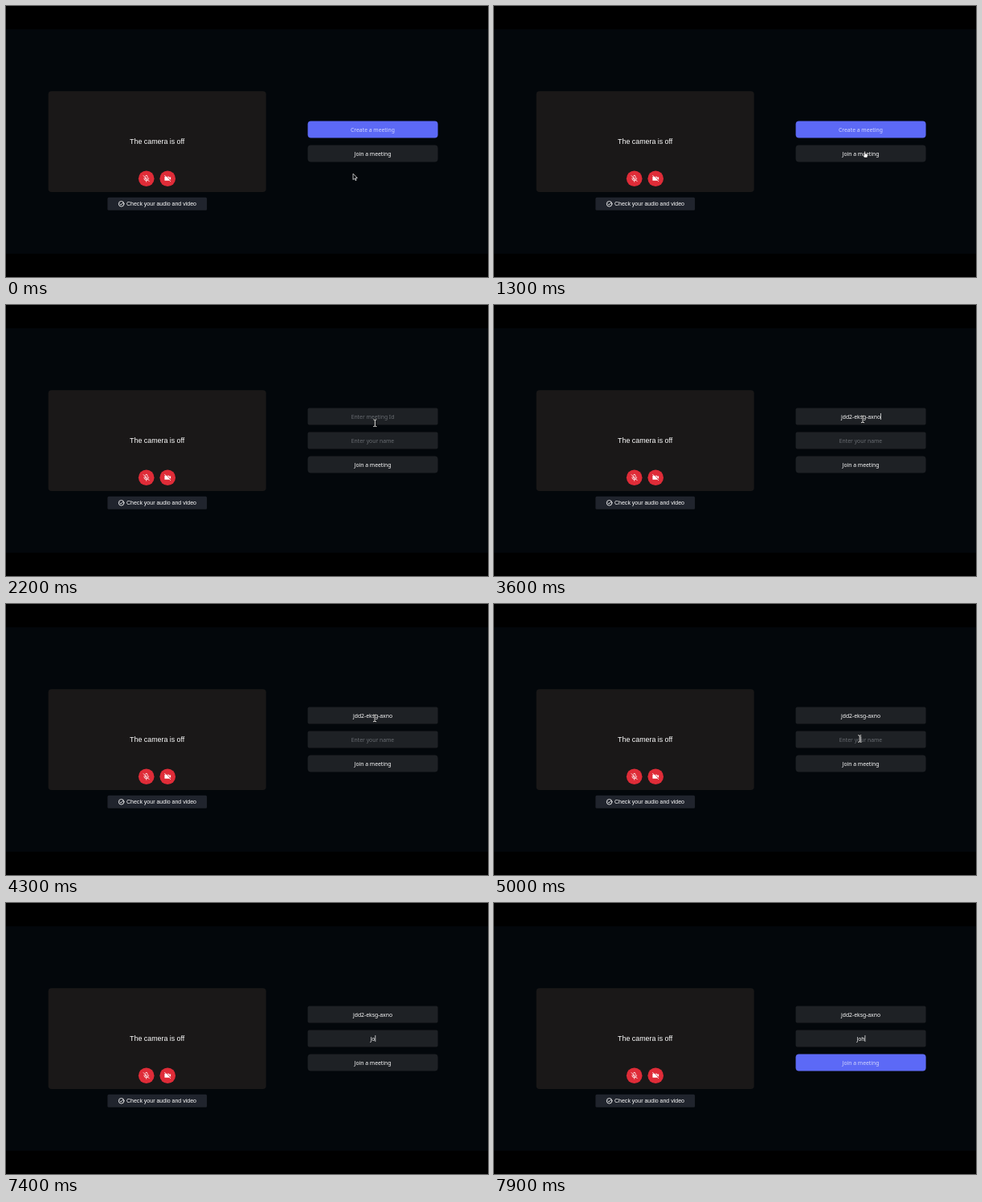
Animation, 600 px wide and 338 px high, one loop 8 s. Source, as an HTML page:

```html
<!DOCTYPE html>
<html lang="en">
<head>
<meta charset="utf-8">
<title>Join a meeting</title>
<style>
  html, body { margin: 0; width: 100%; height: 100%; overflow: hidden; background: #000; }
  svg { display: block; width: 100vw; height: 100vh; }
  text { fill: #fff; text-anchor: middle; }
  .ui { font: 6.8px "Noto Sans", "Open Sans", sans-serif; }
  .plain { font-family: "Liberation Sans", Arial, sans-serif; }
  .dark { fill: #1e2125; }
  .accent { fill: #5c69f6; }
  .line { fill: none; stroke: #fff; stroke-linecap: round; stroke-linejoin: round; }
</style>
</head>
<body>
<svg viewBox="0 0 600 338">
  <rect width="600" height="338" fill="#000"/>
  <rect y="29" width="600" height="280" fill="#03070b"/>

  <rect x="52.7" y="106.2" width="271" height="125.8" rx="4" fill="#1a1818"/>
  <text class="plain" x="188.2" y="172" font-size="8.85">The camera is off</text>

  <g fill="#df2c38">
    <circle cx="174.7" cy="215.2" r="9.8"/>
    <circle cx="201.2" cy="215.2" r="9.8"/>
  </g>
  <g class="line" transform="translate(174.7 215.2)" stroke-width=".8">
    <rect x="-1.3" y="-3.8" width="2.6" height="4.9" rx="1.3"/>
    <path d="M-2.9 -.3a2.9 2.9 0 0 0 5.8 0M0 2.6V4"/>
    <path d="M-3 -4L4.2 3.2" stroke="#df2c38"/>
    <path d="M-3.6 -3.6L3.6 3.6"/>
  </g>
  <g transform="translate(201.2 215.2)">
    <path d="M-3.3 -2.5H1.6Q2.1 -2.5 2.1 -2V-.6L3.9 -2.3V2.3L2.1 .6V2Q2.1 2.5 1.6 2.5H-3.3Q-3.8 2.5 -3.8 2V-2Q-3.8 -2.5 -3.3 -2.5Z" fill="#fff"/>
    <path class="line" d="M-2.7 -4.2L4.3 2.8" style="stroke:#df2c38"/>
    <path class="line" d="M-3.7 -3.9L3.5 3.5" stroke-width=".8"/>
  </g>

  <rect x="126.4" y="238.8" width="123.7" height="16" rx="1.6" fill="#20242d"/>
  <g class="line" stroke-width=".85">
    <circle cx="143.6" cy="246.8" r="3.3"/>
    <path d="M142 246.9l1.2 1.2 2.2-2.5"/>
  </g>
  <text class="plain" x="193.5" y="249.2" font-size="7.02">Check your audio and video</text>

  <g id="home" class="ui">
    <rect class="accent" x="375.6" y="143.6" width="162" height="21" rx="4"/>
    <text x="456.5" y="156.6" style="fill:#d3d7fd">Create a meeting</text>
    <rect class="dark" x="375.6" y="173.6" width="162" height="21" rx="4"/>
    <text x="456.5" y="186.6">Join a meeting</text>
  </g>

  <g id="form" class="ui">
    <rect class="dark" x="375.6" y="128.6" width="162" height="21" rx="2"/>
    <text id="meeting" x="456.5" y="141.6"></text>
    <rect class="dark" x="375.6" y="158.6" width="162" height="21" rx="2"/>
    <text id="name" x="456.5" y="171.6"></text>
    <rect class="dark" x="375.6" y="188.6" width="162" height="21" rx="4"/>
    <rect id="ready" class="accent" x="375.6" y="188.6" width="162" height="21" rx="4"/>
    <text id="joinLabel" x="456.5" y="201.6">Join a meeting</text>
    <rect id="caret" width=".7" height="8" fill="#fff"/>
  </g>

  <path id="arrow" d="M0 0V7.4L1.8 5.8L3 8.4L4.2 7.9L3.1 5.3H5.4Z" fill="#05080b" stroke="#fff" stroke-width=".7" stroke-linejoin="round"/>
  <path id="hand" d="M-.7 .5Q0 -.5 .6 .5V3L3 3.5Q3.7 3.8 3.6 4.6L3 7.8H-.6L-2.3 5.2Q-2.3 4.2 -1.4 4.7L-.7 5.2Z" fill="#fff" stroke="#111" stroke-width=".4"/>
  <g id="beam" fill="none">
    <path d="M-2 -4.3Q0 -4.3 0 -3.5Q0 -4.3 2 -4.3M0 -3.5V3.5M-2 4.3Q0 4.3 0 3.5Q0 4.3 2 4.3" stroke="#111" stroke-width="1.7"/>
    <path d="M-2 -4.3Q0 -4.3 0 -3.5Q0 -4.3 2 -4.3M0 -3.5V3.5M-2 4.3Q0 4.3 0 3.5Q0 4.3 2 4.3" stroke="#fff" stroke-width=".9"/>
  </g>
</svg>
<script>
  const LOOP = 8000, STEP = 100, BLINK = 550, CENTER = 456.5;
  const FORM_OPEN = 1400, PASTE = 3600, CURSOR_HIDDEN = 7200, READY = 7500;
  const MEETING_ID = "jdd2-eksg-axno";
  const NAME_KEYS = [[6200, "J"], [7000, "Jo"], [7600, "Joh"]];
  // Each of these restarts the caret blink.
  const CARET_RESETS = [2500, PASTE, 5000, ...NAME_KEYS.map(key => key[0])];

  const easeInOut = p => p * p * (3 - 2 * p);
  const easeOut = p => 1 - (1 - p) ** 3;
  const MOVES = [
    { start: 0, end: 1200, from: [432, 209.2], to: [461.6, 181.2], ease: easeInOut },
    { start: 1800, end: 2600, from: [461.6, 181.2], to: [459, 142.4], ease: easeOut },
    { start: 4400, end: 4950, from: [459, 142.4], to: [455.2, 168], ease: easeInOut }
  ];

  const el = Object.fromEntries([...document.querySelectorAll("[id]")].map(node => [node.id, node]));
  const clamp = v => Math.max(0, Math.min(1, v));
  const show = (node, on) => node.setAttribute("visibility", on ? "visible" : "hidden");
  const latest = (list, t) => list.filter(item => item <= t).pop();

  function setField(node, value, placeholder) {
    const label = value || placeholder;
    if (node.textContent !== label) node.textContent = label;
    node.style.fill = value ? "#fff" : "#686c71";
  }

  function cursorAt(t) {
    const move = MOVES.filter(m => m.start <= t).pop();
    const p = move.ease(clamp((t - move.start) / (move.end - move.start)));
    return move.from.map((v, i) => v + (move.to[i] - v) * p);
  }

  function cursorKind(y, formOpen) {
    if (!formOpen) return y < 194.6 ? "hand" : "arrow";
    const inField = [128.6, 158.6].some(top => y >= top && y <= top + 21);
    return inField ? "beam" : "arrow";
  }

  function drawCaret(t) {
    const reset = latest(CARET_RESETS, t);
    const on = reset !== undefined && Math.floor((t - reset) / BLINK) % 2 === 0;
    show(el.caret, on);
    if (!on) return;
    const second = t >= 5000;
    const field = second ? el.name : el.meeting;
    const filled = t >= (second ? NAME_KEYS[0][0] : PASTE);
    const half = filled ? field.getComputedTextLength() / 2 : 0;
    el.caret.setAttribute("x", CENTER + half);
    el.caret.setAttribute("y", second ? 165 : 135);
  }

  function draw(t) {
    const formOpen = t >= FORM_OPEN;
    el.home.style.display = formOpen ? "none" : "";
    el.form.style.display = formOpen ? "" : "none";

    const typed = NAME_KEYS.filter(key => key[0] <= t).pop();
    setField(el.meeting, t >= PASTE ? MEETING_ID : "", "Enter meeting Id");
    setField(el.name, typed ? typed[1] : "", "Enter your name");
    drawCaret(t);

    const ready = clamp((t - READY) / 300);
    el.ready.setAttribute("opacity", ready);
    el.joinLabel.style.fill = `rgb(${255 - 44 * ready},${255 - 40 * ready},${255 - 2 * ready})`;

    const [x, y] = cursorAt(t);
    const kind = cursorKind(y, formOpen);
    for (const id of ["arrow", "hand", "beam"]) {
      show(el[id], id === kind && t < CURSOR_HIDDEN);
      el[id].setAttribute("transform", `translate(${x} ${y})`);
    }
  }

  const begin = performance.now();
  function tick() {
    const t = (performance.now() - begin) % LOOP;
    draw(Math.floor(t / STEP) * STEP);
    requestAnimationFrame(tick);
  }
  tick();
</script>
</body>
</html>
```
